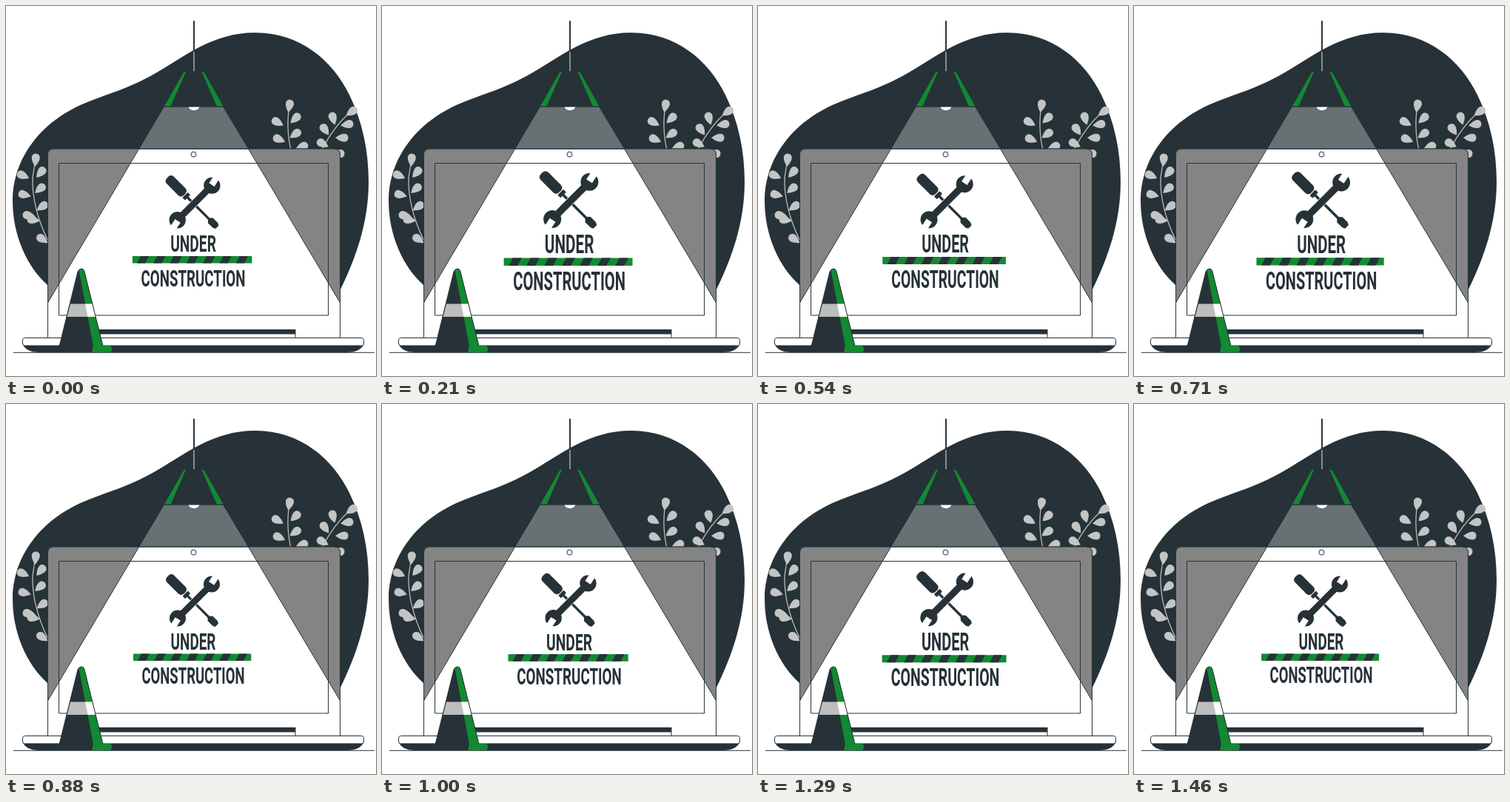
An HTML page for the animation above (1.5 s loop, 500x500 px).

```html
<!DOCTYPE html>
<html lang="en">
<head>
<meta charset="utf-8">
<title>Under construction</title>
<style>
  html, body { margin: 0; width: 100%; height: 100%; overflow: hidden; background: #fff; }
  svg { display: block; width: 100vw; height: 100vh; }
  .dark { fill: #263238; }
  .green { fill: #128a31; }
  .line { fill: none; stroke: #263238; stroke-width: 1; }
  .paper { fill: #fff; stroke: #263238; stroke-width: 1; }
  .stem { fill: none; stroke: #c4c4c4; stroke-width: 1.2; }
  .label { font: 700 31.3px Roboto, sans-serif; text-anchor: middle; fill: #263238; }
</style>
</head>
<body>
<svg viewBox="0 0 500 500">
  <path class="dark" d="M56 377C28 352 9 309 9 264C9 205 48 156 105 132C141 117 165 112 200 92C242 68 279 36 337 36C397 36 441 73 464 120C482 157 490 196 490 238C490 292 473 340 452 383V400H56Z"/>

  <path class="stem" d="M57 318C45 293 35 262 36 232L40 205M385 195C380 172 380 155 383 132M426 196C438 172 450 156 468 141"/>
  <g id="leaves" fill="#c4c4c4"></g>

  <path d="M213.500 136H293.500L327.500 193H179.700Z" fill="#697073"/>

  <path class="paper" d="M56.500 449V201Q56.500 193 64.500 193H443.500Q451.500 193 451.500 201V449Z"/>
  <path fill="#848484" d="M56.500 401V201Q56.500 193 64.500 193H179.700ZM451.500 401V201Q451.500 193 443.500 193H327.500Z"/>
  <path class="line" d="M56.500 449V201Q56.500 193 64.500 193H443.500Q451.500 193 451.500 201V449M71.500 212.500H435.500V418H71.500ZM213.500 136L56.500 401M293.500 136L451.500 401"/>
  <circle class="paper" cx="253.500" cy="200.500" r="3.500"/>

  <path class="line" d="M391 437V449"/>
  <path class="dark" d="M104 437H391V443.500H104Z"/>
  <path class="dark" d="M23 458H483Q478 468 461 468H45Q28 468 23 458Z"/>
  <rect class="paper" x="22.500" y="448.500" width="461" height="10.500" rx="3"/>
  <path class="line" d="M10 468.300H498"/>

  <path class="dark" d="M72 460L97 359Q99 355 102 355Q105 355 106 359L131 460Z"/>
  <path class="green" d="M98.500 357Q100 355 102 355Q105 355 106 359L131.500 460H118Z"/>
  <path fill="#bdbdbd" d="M87 402.500H107.500L111 420H82.500Z"/>
  <path fill="#fff" d="M107 402.500H116.500L121.500 420H110.500Z"/>
  <path class="line" d="M72 460L97 359Q99 355 102 355Q105 355 106 359L131 460" stroke-width=".8"/>
  <path class="dark" d="M60 459H118V468H60Z"/>
  <path class="green" d="M118 459H139Q143 459 143 463.500Q143 468 139 468H116Z"/>

  <path class="line" d="M254 20V62" style="stroke-width:2"/>
  <path d="M254 62V88" stroke="#8c8c8c" stroke-width="2"/>
  <path class="dark" d="M241 89H267L294 136H213Z"/>
  <path class="green" d="M240.500 89H243L222.500 135.500H214ZM264.500 89H267.500L293.500 135.500H285Z"/>
  <path class="line" d="M213 136.200H294"/>
  <path fill="#fff" d="M246.500 136.500H261.500Q259 141 254 141Q249 141 246.500 136.500Z"/>

  <g id="sign">
    <g class="dark" transform="translate(252 266) rotate(45)">
      <rect x="-47" y="-6.700" width="32" height="13.400" rx="5"/>
      <rect x="-14" y="-5" width="5" height="10" rx="1"/>
      <rect x="-10" y="-1.600" width="44" height="3.200"/>
      <path d="M31 -2L34 -4.700H43L46.500 -3V3L43 4.700H34L31 2Z"/>
    </g>
    <g transform="translate(255 266.500) rotate(-45)">
      <rect class="dark" x="-28" y="-4.700" width="56" height="9.400" stroke="#fff" stroke-width=".8"/>
      <g id="jaw">
        <circle class="dark" cx="32.500" cy="0" r="11"/>
        <path d="M33 -1L47 -4" stroke="#fff" stroke-width="8.500" stroke-linejoin="round"/>
      </g>
      <use href="#jaw" transform="rotate(180)"/>
    </g>
    <!-- condensed lettering -->
    <g class="label">
      <text transform="translate(253 332) scale(.605 1)">UNDER</text>
      <text transform="translate(253 377.500) scale(.59 1)">CONSTRUCTION</text>
    </g>
    <rect class="green" x="172" y="337.500" width="159.200" height="9.500"/>
    <path id="stripes" class="dark"/>
  </g>
</svg>
<script>
const $ = id => document.getElementById(id);

// Leaf centre and the direction its tip points to, in degrees.
const leaves = [
  [40, 208, -85], [23, 229, 205], [47, 225, -50], [25, 255, 195], [46, 247, -40],
  [31, 283, 190], [49, 271, -35], [37, 289, 190], [49, 315, 215],
  [383, 135, -80], [367, 157, 210], [391, 152, -45], [369, 180, 205], [391, 173, -35], [400, 190, -20],
  [467, 143, -35], [442, 152, -105], [461, 160, -10], [431, 167, -125], [454, 178, 0],
  [428, 186, -150], [449, 199, 10]
];
$('leaves').innerHTML = leaves.map(([x, y, a]) =>
  `<path transform="translate(${x} ${y}) rotate(${a})" d="M-9 0C-5 -3 -1 -5.500 3 -5.500C7 -5.500 8.500 -2.500 8.500 0C8.500 2.500 7 5.500 3 5.500C-1 5.500 -5 3 -9 0Z"/>`
).join('');

let stripes = '';
for (let i = 0; i < 7; i++) stripes += `M${178 + 22 * i} 347l5 -9.500h11l-5 9.500z`;
$('stripes').setAttribute('d', stripes);

const LOOP = 1500, STEP = 1000 / 24, CX = 251.7, CY = 305;
const beats = [[-70, 1], [167, 1.103], [410, 1], [660, 1.093], [917, 1], [1172, 1.105], [1430, 1], [1667, 1.103]];

function ease(u) {
  const a = u ** 1.75, b = (1 - u) ** 1.75;
  return a / (a + b);
}

function scaleAt(t) {
  const i = beats.findIndex(b => b[0] > t);
  const [t0, s0] = beats[i - 1], [t1, s1] = beats[i];
  return s0 + (s1 - s0) * ease((t - t0) / (t1 - t0));
}

function draw(ms) {
  const t = Math.floor((ms % LOOP + 4) / STEP) * STEP % LOOP;
  const s = scaleAt(t) / 1.004;
  $('sign').setAttribute('transform', `translate(${CX} ${CY}) scale(${s}) translate(${-CX} ${-CY})`);
}

const start = performance.now();
function tick() {
  draw(performance.now() - start);
  requestAnimationFrame(tick);
}
tick();
</script>
</body>
</html>
```
